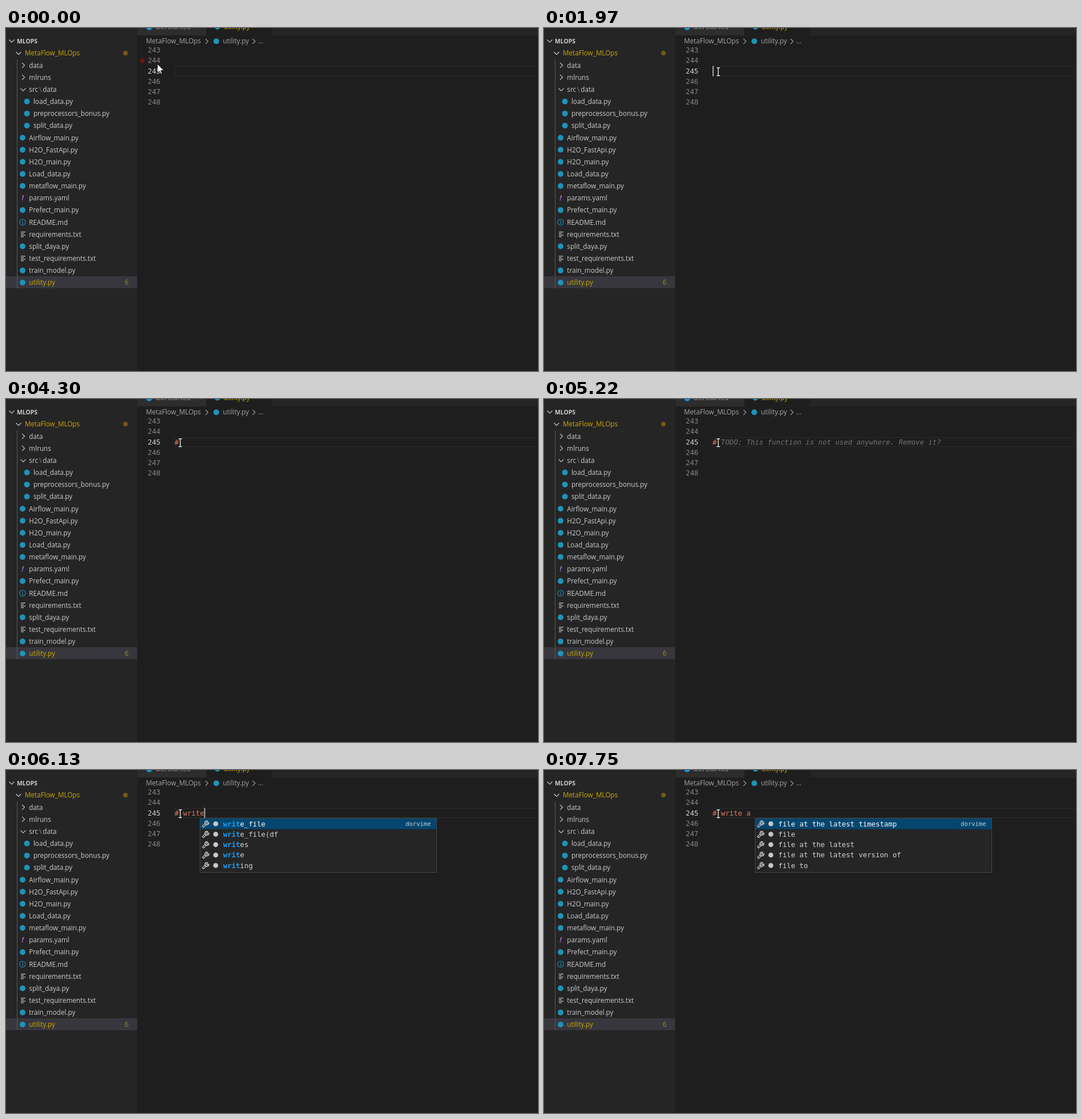
Recreate the animation shown at these times as an HTML page with a canvas. Size 931 by 601 pixels, loop 8 s.

```html
<!DOCTYPE html>
<html lang="en">
<head>
<meta charset="utf-8">
<title>Editor completion</title>
<style>
html, body { margin: 0; width: 100%; height: 100%; overflow: hidden; background: #1e1e1e; }
canvas { display: block; }
</style>
</head>
<body>
<canvas id="stage" width="931" height="601"></canvas>
<script>
const ctx = document.getElementById('stage').getContext('2d');
const LOOP = 8000;
const UI = '11.7px "Open Sans", "Noto Sans", sans-serif';
const MONO_FAMILY = '"DejaVu Sans Mono", monospace';
const MONO = '12.3px ' + MONO_FAMILY;
const CHAR = 7.4, LINE = 18.25, CODE_X = 295, CODE_Y = 75.3;
const GREY = '#cccccc', GOLD = '#cca700', BLUE = '#1f93b8';

const GHOST = 'TODO: This function is not used anywhere. Remove it?';
const LISTS = {
  wr: ['write_file', 'write_file(df', 'writes', 'write', 'writing'],
  write: ['write the', 'write files', 'write the file', 'write file', 'write a file'],
  a: ['a file', 'a file to', 'a file at the latest', 'a new file', 'a file with'],
  next: ['file at the latest timestamp', 'file', 'file at the latest',
         'file at the latest version of', 'file to']
};

// Each step changes only the listed properties.
const STEPS = [
  [0, { text: '', caret: false, ghost: false, popup: null, dot: 57, pointer: ['arrow', 265, 63] }],
  [120, { dot: 75, pointer: ['arrow', 284, 75] }],
  [270, { dot: 0, pointer: ['beam', 301, 81] }],
  [390, { pointer: ['beam', 299, 86] }],
  [540, { pointer: ['beam', 305, 76.5] }],
  [970, { caret: true }],
  [1410, { caret: false }],
  [1970, { caret: true }],
  [2400, { caret: false }],
  [2930, { caret: true }],
  [3460, { text: '#' }],
  [3740, { text: '# ' }],
  [4300, { caret: false }],
  [4420, { ghost: true }],
  [4690, { caret: true }],
  [5220, { caret: false }],
  [5370, { text: '# w', caret: true, ghost: false }],
  [5770, { text: '# wr' }],
  [5890, { popup: ['wr', 4, 'wr'] }],
  [6010, { text: '# writ', popup: ['wr', 5, 'wri'] }],
  [6130, { text: '# write', popup: ['wr', 6, 'writ'] }],
  [6280, { popup: ['write', 7, 'write'] }],
  [6650, { caret: false }],
  [6900, { text: '# write ', caret: true }],
  [7050, { text: '# write a', popup: ['a', 9, 'a'] }],
  [7200, { text: '# write a ' }],
  [7320, { popup: ['next', 10, ''] }],
  [7750, { caret: false }]
];

const TREE = [
  ['data', 'right'], ['mlruns', 'right'], ['src', 'down'],
  ['load_data.py', 'py', 1], ['preprocessors_bonus.py', 'py', 1], ['split_data.py', 'py', 1],
  ['Airflow_main.py', 'py'], ['H2O_FastApi.py', 'py'], ['H2O_main.py', 'py'],
  ['Load_data.py', 'py'], ['metaflow_main.py', 'py'], ['params.yaml', 'yaml'],
  ['Prefect_main.py', 'py'], ['README.md', 'info'], ['requirements.txt', 'txt'],
  ['split_daya.py', 'py'], ['test_requirements.txt', 'txt'], ['train_model.py', 'py'],
  ['utility.py', 'py']
];

function rect(x, y, w, h, color) {
  ctx.fillStyle = color;
  ctx.fillRect(x, y, w, h);
}

function circle(x, y, r, color) {
  ctx.fillStyle = color;
  ctx.beginPath();
  ctx.arc(x, y, r, 0, Math.PI * 2);
  ctx.fill();
}

function label(str, x, midY, color, font = UI, align = 'left') {
  ctx.font = font;
  ctx.textAlign = align;
  ctx.fillStyle = color;
  ctx.fillText(str, x, midY + 4.3);
}

function stroke(points, color, width = 1) {
  ctx.strokeStyle = color;
  ctx.lineWidth = width;
  ctx.beginPath();
  points.forEach(([x, y]) => ctx.lineTo(x, y));
  ctx.stroke();
}

function chevron(x, y, dir, color = GREY) {
  const shape = dir === 'down' ? [[-4.5, -2], [0, 2.5], [4.5, -2]] : [[-2, -4.5], [2.5, 0], [-2, 4.5]];
  stroke(shape.map(([dx, dy]) => [x + dx, y + dy]), color, 1.2);
}

const ICONS = {
  right: (x, y) => chevron(x + 1, y, 'right'),
  down: (x, y) => chevron(x + 1, y, 'down'),
  py: (x, y) => circle(x, y, 5, BLUE),
  yaml: (x, y) => label('!', x, y, '#a86cd0', 'italic bold 13px "Open Sans", sans-serif', 'center'),
  info(x, y) {
    ctx.strokeStyle = BLUE;
    ctx.lineWidth = 1.1;
    ctx.beginPath();
    ctx.arc(x, y, 5.2, 0, Math.PI * 2);
    ctx.stroke();
    rect(x - 0.6, y - 3, 1.3, 1.4, BLUE);
    rect(x - 0.6, y - 0.8, 1.3, 3.8, BLUE);
  },
  txt(x, y) {
    [9, 6, 9, 6].forEach((w, i) => rect(x - 3, y - 4.5 + i * 2.7, w - 1, 1.2, '#c5c8c6'));
  }
};

function drawSidebar() {
  rect(0, 0, 229.5, 601, '#252526');
  chevron(10, 22.5, 'down');
  label('MLOPS', 19, 22.5, GREY, 'bold 10.4px "Open Sans", sans-serif');
  chevron(22, 44, 'down');
  label('MetaFlow_MLOps', 33, 44, GOLD);
  circle(209, 44, 4, '#735a14');
  rect(0, 435, 229.5, 21, '#37373d');
  rect(19, 55, 1, 401, '#585858');
  TREE.forEach(([name, icon, depth = 0], i) => {
    const y = 65.3 + i * 21.15;
    const x = 29 + depth * 7.6;
    ICONS[icon](x, y);
    label(name, x + 11.3, y, name === 'utility.py' ? GOLD : GREY);
  });
  label('\\', 58, 107.6, '#858585');
  label('data', 64.3, 107.6, GREY);
  label('6', 211, 446, '#a98c0b', UI, 'center');
}

function drawHeader() {
  rect(229.5, 0, 702, 13, '#252526');
  rect(230, 0, 120.5, 13, '#2d2d2d');
  rect(351, 0, 114.5, 13, '#1e1e1e');
  circle(250.5, -1, 4.8, '#1c94dc');
  label('Get Started', 261, -2.6, '#909090');
  circle(370, -2.3, 5, BLUE);
  label('utility.py', 381, -2.6, GOLD);

  label('MetaFlow_MLOps', 245, 23, '#a5a5a5');
  chevron(351, 23.3, 'right', '#a5a5a5');
  circle(368, 23.3, 5, BLUE);
  label('utility.py', 379.5, 23, '#a5a5a5');
  chevron(433.5, 23.3, 'right', '#a5a5a5');
  label('...', 441, 23, '#a5a5a5');
}

function drawEditor(state) {
  for (let i = 0; i < 6; i++) {
    label(243 + i, 248, 38.8 + i * LINE, i === 2 ? '#d0d0d0' : '#858585', MONO);
  }
  ctx.strokeStyle = '#2b2b2b';
  ctx.lineWidth = 1;
  ctx.strokeRect(295.5, 67.5, 650, 16);
  if (state.dot) circle(238.5, state.dot + 0.5, 3.9, '#75130f');

  label(state.text, CODE_X, CODE_Y, '#e8795c', MONO);
  if (state.ghost) label(GHOST, CODE_X + 2 * CHAR, CODE_Y, '#727272', 'italic ' + MONO);
  if (state.caret) rect(CODE_X + state.text.length * CHAR, 66.3, 1.7, 18.2, '#b8b9b7');
}

function drawWrench(x, y) {
  stroke([[x - 4.8, y + 5], [x + 1.3, y - 1]], '#c8c8c8', 4);
  stroke([[x - 4, y + 4.2], [x + 1.8, y - 1.5]], '#252526', 1.5);
  ctx.strokeStyle = '#c8c8c8';
  ctx.lineWidth = 1.5;
  ctx.beginPath();
  ctx.arc(x + 2.5, y - 2.2, 3.3, -0.2, Math.PI * 1.62);
  ctx.lineTo(x + 2, y - 2.5);
  ctx.lineTo(x + 3.2, y - 1.4);
  ctx.closePath();
  ctx.stroke();
}

function drawPopup([list, column, match]) {
  const left = Math.round(CODE_X + column * CHAR);
  rect(left, 84, 415, 96, '#454545');
  rect(left + 1, 85, 413, 94, '#252526');
  rect(left + 1, 85, 413, 18.5, '#04466f');
  LISTS[list].forEach((entry, i) => {
    const y = 94.2 + i * LINE;
    const color = i ? '#d4d4d4' : '#ffffff';
    drawWrench(left + 10, y + 0.5);
    circle(left + 28, y, 4.3, '#c8c8c8');
    label(match, left + 41, y, '#1a9ff5', 'bold ' + MONO);
    label(entry.slice(match.length), left + 41 + match.length * CHAR, y, color, MONO);
  });
  label('dorvime', left + 404.5, 93.6, '#c3d0d9', '10.5px ' + MONO_FAMILY, 'right');
}

function drawPointer([kind, x, y]) {
  if (kind === 'beam') {
    const parts = [[-0.7, -7, 1.4, 14], [-3, -7.5, 6, 1.4], [-3, 6.3, 6, 1.4]];
    parts.forEach(([dx, dy, w, h]) => rect(x + dx - 0.8, y + dy - 0.8, w + 1.6, h + 1.6, '#111111'));
    parts.forEach(([dx, dy, w, h]) => rect(x + dx, y + dy, w, h, '#f2f2f2'));
    return;
  }
  const outline = [[0, 0], [0, 15.5], [3.6, 12.2], [6, 17.8], [8.2, 16.8], [5.9, 11.4], [10.8, 11]];
  ctx.beginPath();
  outline.forEach(([dx, dy]) => ctx.lineTo(x + dx, y + dy));
  ctx.closePath();
  ctx.fillStyle = '#ffffff';
  ctx.fill();
  ctx.strokeStyle = '#111111';
  ctx.lineWidth = 0.9;
  ctx.stroke();
}

function stateAt(time) {
  const state = {};
  for (const [start, change] of STEPS) {
    if (start <= time) Object.assign(state, change);
  }
  return state;
}

let origin;
function draw(now) {
  origin ??= now;
  const state = stateAt((now - origin) % LOOP);
  rect(0, 0, 931, 601, '#1e1e1e');
  drawSidebar();
  drawHeader();
  drawEditor(state);
  if (state.popup) drawPopup(state.popup);
  drawPointer(state.pointer);
  requestAnimationFrame(draw);
}
requestAnimationFrame(draw);
</script>
</body>
</html>
```
